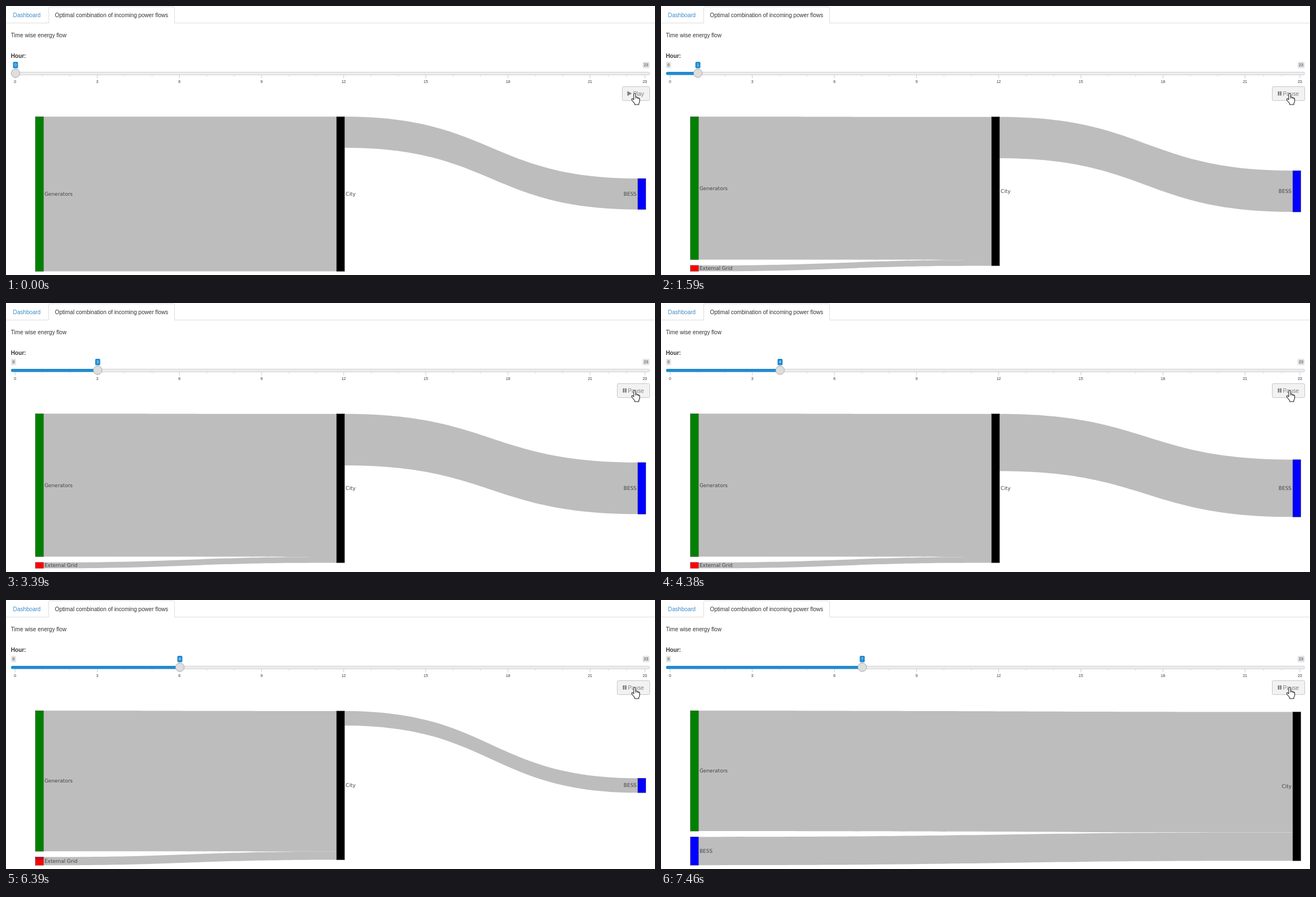
An HTML page for the animation above (8000 ms loop, 1161 px wide and 482 px high).

```html
<!DOCTYPE html>
<html lang="en">
<head>
<meta charset="utf-8">
<title>Time wise energy flow</title>
<style>
html, body { margin: 0; width: 100%; height: 100%; overflow: hidden; background: #fff; }
svg { display: block; width: 1161px; height: 482px; font: 10.1px "Liberation Sans", Arial, sans-serif; fill: #333; }
.small { font-size: 7px; }
.mid { text-anchor: middle; }
.chart { font: 9px "DejaVu Sans", Verdana, sans-serif; fill: #444; }
.link { fill: #bdbdbd; }
</style>
</head>
<body>
<svg viewBox="0 0 1161 482">
  <path d="M1 30.5H76.5V4Q76.5 1.5 79 1.5H299Q301.5 1.5 301.5 4V30.5H1160" fill="none" stroke="#ddd"/>
  <text x="12.6" y="19.5" fill="#3a8bc8">Dashboard</text>
  <text x="87.6" y="19.5">Optimal combination of incoming power flows</text>
  <text x="8.8" y="56">Time wise energy flow</text>
  <text x="8.8" y="93" font-weight="bold">Hour:</text>
  <rect x="9.5" y="118.5" width="1142" height="5" rx="2.5" fill="#ededed" stroke="#cfcfcf"/>
  <g id="ticks" class="small mid"></g>
  <g id="slider" class="small mid"></g>
  <g id="button"></g>
  <path d="M1123 167V158.500Q1123 156.500 1124.700 156.500T1126.400 158.500V163.500Q1128.500 162.300 1129.300 164.300Q1131 163.500 1131.700 165.200Q1133.600 164.800 1133.600 167V170.500Q1133.400 173 1132 174.500V176.700H1124.700V174.800Q1122.500 172.500 1119.500 168.300Q1118.800 166.300 1120.500 166Q1121.800 166 1123 168Z" fill="#fff" stroke="#222" stroke-width="1.100" stroke-linejoin="round"/>
  <path d="M1126.400 163.500V166M1129.300 164.300V166.500M1131.700 165.200V167" stroke="#222" stroke-width=".8"/>
  <g id="chart" class="chart"></g>
</svg>
<script>
const LOOP = 8000, TOP = 198.3, GAP = 10.3, NODE = 14.6;
const LEFT = 52.5, MIDDLE = 591.2, RIGHT = 1130.1;
const COLORS = { Generators: 'green', 'External Grid': 'red', BESS: 'blue', City: 'black' };
const sliderTimes = [1360, 2380, 3390, 4380, 5400, 6390, 7390];
const chartTimes = [1590, 2450, 3450, 4440, 5460, 6450, 7460];

// Power per hour; "charge" is the flow from City on to BESS.
const flow = (cityTop, inputs, charge) => ({ cityTop, inputs, charge });
const night = { Generators: 256.2, 'External Grid': 10.5 };
const dawn = { Generators: 251.9, 'External Grid': 14.8 };
const hours = [
  flow(TOP, { Generators: 277.2 }, 55.6),
  flow(198.7, night, 74),
  flow(198.7, night, 92.4),
  flow(198.7, night, 102.6),
  flow(198.9, dawn, 44.4),
  flow(198.9, dawn, 26),
  flow(200.2, { Generators: 229, BESS: 13.8, 'External Grid': 13.5 }, 0),
  flow(200.6, { Generators: 215.8, BESS: 50.8 }, 0)
];

const $ = id => document.getElementById(id);
const rect = (x, y, w, h, attrs) => `<rect x="${x}" y="${y}" width="${w}" height="${h}" ${attrs}/>`;
const text = (x, y, label, attrs = '') => `<text x="${x}" y="${y}" ${attrs}>${label}</text>`;
const badge = (x, label, fill, ink) => {
  const w = label > 9 ? 12.5 : 9;
  return rect(x - w / 2, 100, w, 11.5, `rx="2" fill="${fill}"`) + text(x, 108.3, label, `fill="${ink}"`);
};

function link(x0, y0, x1, y1, size) {
  const a = x0 + NODE, m = (a + x1) / 2;
  return `<path class="link" d="M${a} ${y0}C${m} ${y0} ${m} ${y1} ${x1} ${y1}v${size}` +
    `C${m} ${y1 + size} ${m} ${y0 + size} ${a} ${y0 + size}Z"/>`;
}

function node(name, x, y, size) {
  const atRight = x === RIGHT;
  return rect(x, y, NODE, size, `fill="${COLORS[name]}" stroke="#444" stroke-width=".5"`) +
    text(atRight ? x - 2 : x + NODE + 1.8, y + size / 2 + 3.2, name, atRight ? 'text-anchor="end"' : '');
}

function drawChart(hour) {
  const { cityTop, inputs, charge } = hours[hour];
  const cityX = charge ? MIDDLE : RIGHT;
  let links = '', nodes = '', y = TOP, cityY = cityTop;
  for (const [name, size] of Object.entries(inputs)) {
    links += link(LEFT, y, cityX, cityY, size);
    nodes += node(name, LEFT, y, size);
    y += size + GAP;
    cityY += size;
  }
  nodes += node('City', cityX, cityTop, cityY - cityTop);
  if (charge) {
    const bessY = (cityTop + cityY - charge) / 2;
    links += link(cityX, cityTop, RIGHT, bessY, charge);
    nodes += node('BESS', RIGHT, bessY, charge);
  }
  if (inputs === dawn) nodes += rect(LEFT, 460.7, NODE, 4.6, 'fill="#b01226"');
  $('chart').innerHTML = links + nodes;
}

function drawSlider(hour) {
  const x = 17 + 49 * hour;
  $('slider').innerHTML =
    (hour ? rect(9, 118, x - 9, 5.6, 'rx="2.5" fill="#208bd0"') + badge(13.5, 0, '#e3e3e3', '#333') : '') +
    badge(1145, 23, '#e3e3e3', '#333') + badge(x, hour, '#208bd0', '#fff') +
    `<circle cx="${x}" cy="120.500" r="7.700" fill="#dedede" stroke="#aaa"/>`;
}

function drawButton(playing) {
  const x = playing ? 1093.5 : 1102.5;
  $('button').innerHTML = rect(x, 144.5, 1151.5 - x, 25, 'rx="2" fill="#f2f2f2" stroke="#c6c6c6"') +
    `<g fill="#808080">` + (playing
      ? rect(1103.5, 153, 2.7, 7.5, '') + rect(1107.3, 153, 2.7, 7.5, '') + text(1112.5, 160.5, 'Pause')
      : '<path d="M1111.500 152.300L1119.500 156.700L1111.500 161.200Z"/>' + text(1121.7, 160.5, 'Play')) + '</g>';
}

function drawTicks() {
  const tick = (x, h, color) => rect(x - .5, 124, 1, h, `fill="${color}"`);
  const marks = [0, 3, 6, 9, 12, 15, 18, 21, 23];
  const at = hour => 16.3 + 48.98 * hour;
  $('ticks').innerHTML = marks.map((hour, i) => {
    const x = at(hour), step = (at(marks[i + 1]) - x) / 3;
    return tick(x, 5.5, '#a9d0ea') + text(x, 138, hour) +
      (step ? tick(x + step, 3, '#ddd') + tick(x + 2 * step, 3, '#ddd') : '');
  }).join('');
}

const shown = {};
function update(key, value, draw) {
  if (shown[key] === value) return;
  shown[key] = value;
  draw(value);
}

function frame() {
  const t = performance.now() % LOOP;
  const passed = times => times.filter(time => time <= t).length;
  update('slider', passed(sliderTimes), drawSlider);
  update('chart', passed(chartTimes), drawChart);
  update('button', t >= 280, drawButton);
  requestAnimationFrame(frame);
}

drawTicks();
frame();
</script>
</body>
</html>
```
